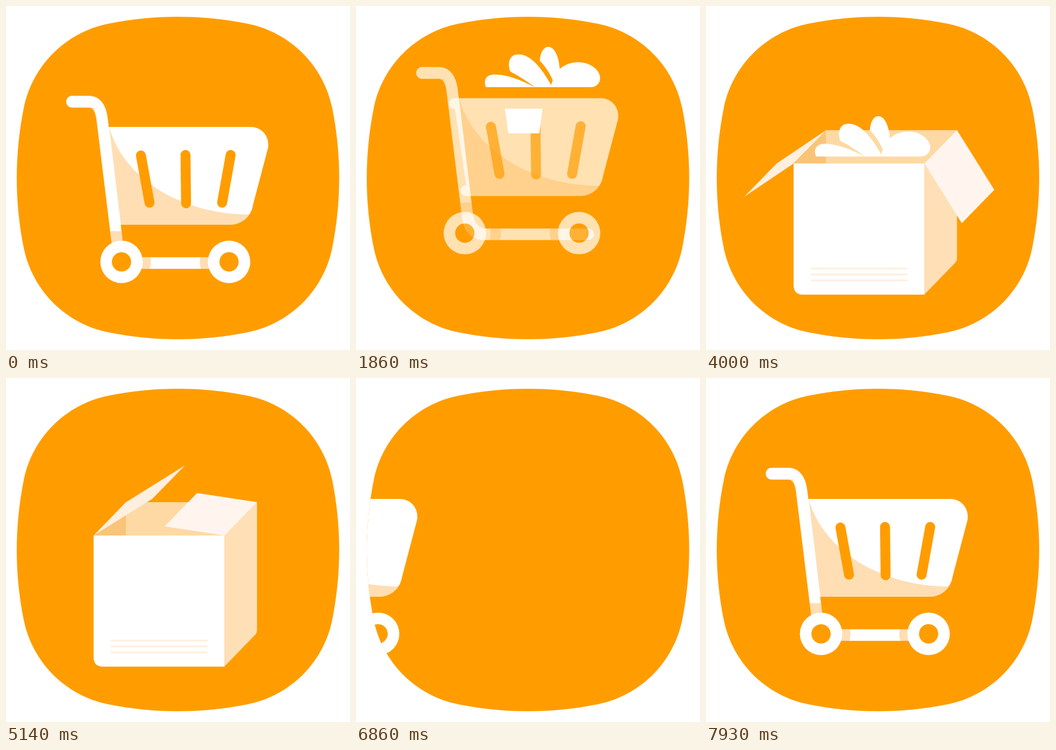
Animation, 640 px wide and 640 px high, one loop 8 s. Source, as an HTML page with a canvas:

```html
<!DOCTYPE html>
<html lang="en">
<head>
<meta charset="utf-8">
<title>Cart and box</title>
<style>
html, body { margin: 0; width: 100%; height: 100%; overflow: hidden; background: #fff; }
canvas { display: block; width: 100vmin; height: 100vmin; }
</style>
</head>
<body>
<canvas id="stage" width="640" height="640"></canvas>
<script>
const ctx = document.getElementById('stage').getContext('2d');
const LOOP = 8000;
const ORANGE = '#ff9d00', WHITE = '#fff', SHADE = 'rgba(255,146,8,.3)', BEIGE = '#ffdfb5';
const TAU = Math.PI * 2, RAD = Math.PI / 180;

const lerp = (a, b, p) => a + (b - a) * p;
const ease = u => (1 - Math.cos(Math.PI * u)) / 2;

// Value at time t from [time, value] keys, eased between neighbours.
function key(t, ...keys) {
  if (t <= keys[0][0]) return keys[0][1];
  for (let i = 1; i < keys.length; i++) {
    const [t0, a] = keys[i - 1], [t1, b] = keys[i];
    if (t < t1) return lerp(a, b, ease((t - t0) / (t1 - t0)));
  }
  return keys[keys.length - 1][1];
}

function fill(path, color, rule) {
  ctx.fillStyle = color;
  ctx.fill(path, rule || 'nonzero');
}

function poly(color, ...pts) {
  const p = new Path2D();
  pts.forEach(([x, y]) => p.lineTo(x, y));
  p.closePath();
  fill(p, color);
}

function disc(x, y, r, color) {
  if (r <= 0) return;
  const p = new Path2D();
  p.arc(x, y, r, 0, TAU);
  fill(p, color);
}

function line(x0, y0, x1, y1, width, color, cap) {
  ctx.lineWidth = width;
  ctx.strokeStyle = color;
  ctx.lineCap = cap;
  ctx.beginPath();
  ctx.moveTo(x0, y0);
  ctx.lineTo(x1, y1);
  ctx.stroke();
}

function withState(draw) {
  ctx.save();
  draw();
  ctx.restore();
}

// Badge: one quarter turned four times.
const badge = new Path2D();
{
  const quarter = new Path2D('M0 0L33 190C49 111 111 49 190 33C277 15.7 363 15.7 450 33L320 320L33 190Z');
  for (let i = 0; i < 4; i++) {
    const m = new DOMMatrix().translate(320, 320).rotate(90 * i).translate(-320, -320);
    const q = new Path2D('M320 320L33 190C49 111 111 49 190 33C277 15.7 363 15.7 450 33Z');
    badge.addPath(q, m);
  }
}

const basket = new Path2D('M182 225H455C477 225 491 244 487.500 264L459.500 370C456 392 439 407 417 407' +
  'H204A10 10 0 0 1 205 387L184 245A10 10 0 0 1 182 225Z');
const basketShade = new Path2D('M192 225C218 320 325 388 455 388C448 400 434 407 417 407H213.500Z');
const frame = new Path2D('M123 167H154C173 167 186 182 189 207L217 436C219 455 227 467.500 243 467.500H432' +
  'A10.700 10.700 0 0 1 432 489H241C215 489 200 475 197 445L168 209C166 196 161 189 154 189H123A11 11 0 0 1 123 167Z');
const nookShade = new Path2D('M154 189H163Q166 197 168 209C166 196 161 189 154 189Z');
const barShadeLeft = new Path2D('M250 467.500H268.500Q271 478 267.500 489H250Z');
const barShadeRight = new Path2D('M380 467.500H361.500Q359 478 362.500 489H380Z');
const bow = new Path2D('M242 151C237 140 241 130 252 128C275 125 305 137 333 151Z' +
  'M333 151C318 140 303 130 287 122C281 105 286 90 302 90C327 90 347 119 363 147L366 138' +
  'C362 128 353 113 342 102C343 85 350 75 359 76C372 78 378 100 379 117' +
  'C400 99 430 102 445 116C462 132 453 151 437 151Z');

function wheel(x, y, r, hole) {
  disc(x, y, hole, ORANGE);
  const ring = new Path2D();
  ring.arc(x, y, r, 0, TAU);
  ring.moveTo(x + hole, y);
  ring.arc(x, y, hole, 0, TAU);
  fill(ring, WHITE, 'evenodd');
}

function slot(x0, y0, x1, y1, p) {
  if (p <= 0) return;
  const cx = (x0 + x1) / 2, cy = (y0 + y1) / 2;
  line(lerp(cx, x0, p), lerp(cy, y0, p), lerp(cx, x1, p), lerp(cy, y1, p), 18.5, ORANGE, 'round');
}

function drawCart(o) {
  withState(() => {
    ctx.globalAlpha = o.alpha;
    ctx.translate(298 + o.x, 516 + o.y);
    ctx.scale(o.sx, o.sy);
    ctx.translate(-298, -516);
    withState(() => {
      ctx.translate(190, 225 + o.sag);
      ctx.rotate(o.sag * 0.0007);
      ctx.translate(-190, -225);
      fill(basket, WHITE);
      fill(basketShade, SHADE);
    });
    slot(251, 278, 267, 366, o.slots[0]);
    slot(334, 277, 335, 367, o.slots[1]);
    slot(418, 277, 402, 366, o.slots[2]);
    fill(frame, WHITE);
    fill(nookShade, SHADE);
    poly(SHADE, [193.5, 419], [215, 419], [218, 442], [197, 442]);
    fill(barShadeLeft, SHADE);
    fill(barShadeRight, SHADE);
    wheel(215 + o.roll, 476, 39.5, 18);
    wheel(415, 476, 39.5, 18);
  });
}

function cartLeaving(t) {
  drawCart({
    x: 0,
    y: key(t, [430, 0], [640, 25], [950, -114], [1250, -34], [1450, -60], [1650, -53.5]),
    sx: key(t, [430, 1], [640, 1.08], [830, 0.95], [1050, 1]),
    sy: key(t, [430, 1], [640, 0.88], [830, 1.03], [1050, 1]),
    sag: 0,
    roll: key(t, [1450, 0], [1860, -12.5]),
    slots: [1, 1, 1],
    alpha: key(t, [1740, 1], [1860, 0.7], [2040, 0])
  });
}

function cartArriving(t) {
  drawCart({
    x: key(t, [6700, -520], [7180, 58], [7540, -7], [8050, 0]),
    y: 0, sx: 1, sy: 1, roll: 0, alpha: 1,
    sag: key(t, [7050, 0], [7270, 10.5], [7480, -3], [7620, 0]),
    slots: [0, 1, 2].map(i => key(t, [7020 + 85 * i, 0], [7400 + 85 * i, 1]))
  });
}

function drawBow(t) {
  const grow = key(t, [1400, 0], [1660, 1.02], [1780, 1]);
  if (grow <= 0 || t > 4700) return;
  const dy = key(t, [2080, 0], [3100, 126], [4000, 129], [4500, 265]);
  withState(() => {
    ctx.translate(347 - 0.287 * Math.min(dy, 150), 151 + dy);
    ctx.scale(grow, grow);
    ctx.translate(-347, -151);
    fill(bow, WHITE);
  });
}

// Front face with a rounded lower left corner.
function front(x, y, w, h, r, taper, color) {
  const p = new Path2D();
  p.moveTo(x, y);
  p.lineTo(x + w, y);
  p.lineTo(x + w - taper, y + h);
  p.lineTo(x + r + taper, y + h);
  p.quadraticCurveTo(x + taper, y + h, x + taper, y + h - r);
  p.closePath();
  fill(p, color);
}

function drawFront(t) {
  const s = key(t, [1700, 0], [1860, 1]);
  if (s <= 0) return;
  const q = key(t, [1860, 0], [2080, 1], [2190, 1.035], [2310, 0.98], [2430, 1]);
  const w = lerp(70, 243.5, q) * s, h = lerp(46, 244, q) * s;
  const cx = lerp(312, 284.7, q), cy = lerp(214, 415, q);
  const x = cx - w / 2, y = cy - h / 2;
  const r = Math.max(0, lerp(3, 18, q) * s), taper = Math.max(0, 6 * (1 - q)) * s;
  const edge = key(t, [2500, 0], [2700, 3.5], [2850, 3.5], [3200, 0]);
  if (edge > 0) {
    front(x, y, w, h, r, taper, '#ffe3bf');
    front(x + edge * 0.6, y + edge, w - edge * 1.7, h - edge * 2, r, taper, WHITE);
  } else {
    front(x, y, w, h, r, taper, WHITE);
  }
  const text = key(t, [2430, 0], [2700, 1]);
  for (let i = 0; i < 3; i++) {
    if (text > 0) line(195, 488.5 + 11 * i, 195 + 180 * text, 488.5 + 11 * i, 3.6, '#fff0e2', 'butt');
  }
}

function drawInside(t) {
  const k = key(t, [2760, 0], [3200, 1]);
  if (t > 2600 && k < 1) {
    const x = key(t, [2600, 300], [2790, 243], [3200, 163]);
    const reach = key(t, [2600, 0], [2790, 0.8], [3000, 1]);
    poly('#ffd290', [x, 293], [x + 60 * reach, 293 - 62 * reach],
      [x + 9 + 60 * reach, 293 - 62 * reach], [x + 9, 293]);
  }
  if (k <= 0) return;
  withState(() => {
    ctx.globalAlpha = k;
    poly('#ffd9a3', [223, 231], [467, 231], [406, 294], [223, 294]);
    poly('#fac478', [163, 294], [223, 231], [223, 294]);
  });
}

function drawSide(t) {
  const h = key(t, [2640, 0], [2790, 14], [3320, 244]);
  if (h <= 0) return;
  const r = Math.min(12, h / 6);
  const p = new Path2D();
  p.moveTo(406, 293);
  p.lineTo(467, 231);
  p.lineTo(467, 231 + h - r * 0.55);
  p.quadraticCurveTo(467, 231 + h, 467 - r * 0.45, 231 + h + r * 0.4);
  p.lineTo(406, 293 + h);
  p.closePath();
  fill(p, h < 60 ? '#ffd290' : BEIGE);
}

function flap(x, angle, length, color) {
  if (length <= 0) return;
  const dx = Math.cos(angle * RAD) * length, dy = Math.sin(angle * RAD) * length;
  poly(color, [x, 293], [x + 60.5, 231], [x + 60.5 + dx, 231 + dy], [x + dx, 293 + dy]);
}

function drawBox(t) {
  withState(() => {
    const dx = key(t, [5620, 0], [5950, 30], [6240, -42], [6360, -19], [6800, 540]);
    const dy = key(t, [2430, 0], [2720, -4.5], [2800, -4.5], [3050, 0], [5740, 0], [5950, -97], [6180, -10], [6360, -24]);
    ctx.translate(285 + dx, 537 + dy);
    ctx.rotate(key(t, [5620, 0], [5950, 3], [6220, 0], [6360, -4.4], [6550, -6]) * RAD);
    ctx.scale(1, key(t, [5560, 1], [5740, 0.93], [5930, 1.01], [6180, 0.9]));
    ctx.translate(-285, -537);

    if (t < 5500) drawInside(t);
    if (t > 2040) withState(() => {
      ctx.setTransform(1, 0, 0, 1, 0, 0);
      drawBow(t);
    });
    const out = key(t, [3250, 0], [3790, 0.8], [4000, 1]);
    flap(163, key(t, [4080, 146], [5500, 360]), out * key(t, [4080, 111], [5500, 132]), '#ffefdf');
    drawFront(t);
    drawSide(t);
    flap(406.5, key(t, [4000, 58], [5300, -180]), out * key(t, [4000, 131], [5300, 112]), '#fff5ee');
  });

  const shift = key(t, [6240, -42], [6360, -19], [6800, 540]);
  const roller = (x, t0) => {
    const r = key(t, [t0, 0], [t0 + 180, 39.5]);
    if (r > 0) wheel(x + shift, 478, r, key(t, [t0 + 130, 0], [t0 + 240, 18]));
  };
  roller(183.5, 6237);
  roller(383.5, 6365);
}

function draw(t) {
  ctx.setTransform(1, 0, 0, 1, 0, 0);
  ctx.fillStyle = WHITE;
  ctx.fillRect(0, 0, 640, 640);
  // Full middle disc closes the hairlines between the quarters.
  fill(badge, ORANGE);
  ctx.strokeStyle = ORANGE;
  disc(320, 320, 290, ORANGE);
  line(52, 182, 588, 458, 30, ORANGE, 'butt');
  withState(() => {
    ctx.clip(badge);
    if (t < 2040) cartLeaving(t);
    if (t < 2040) drawBow(t);
    if (t > 1700 && t < 6820) drawBox(t);
    if (t > 6700) cartArriving(t);
  });
}

function tick() {
  draw(performance.now() % LOOP);
  requestAnimationFrame(tick);
}
tick();
</script>
</body>
</html>
```
